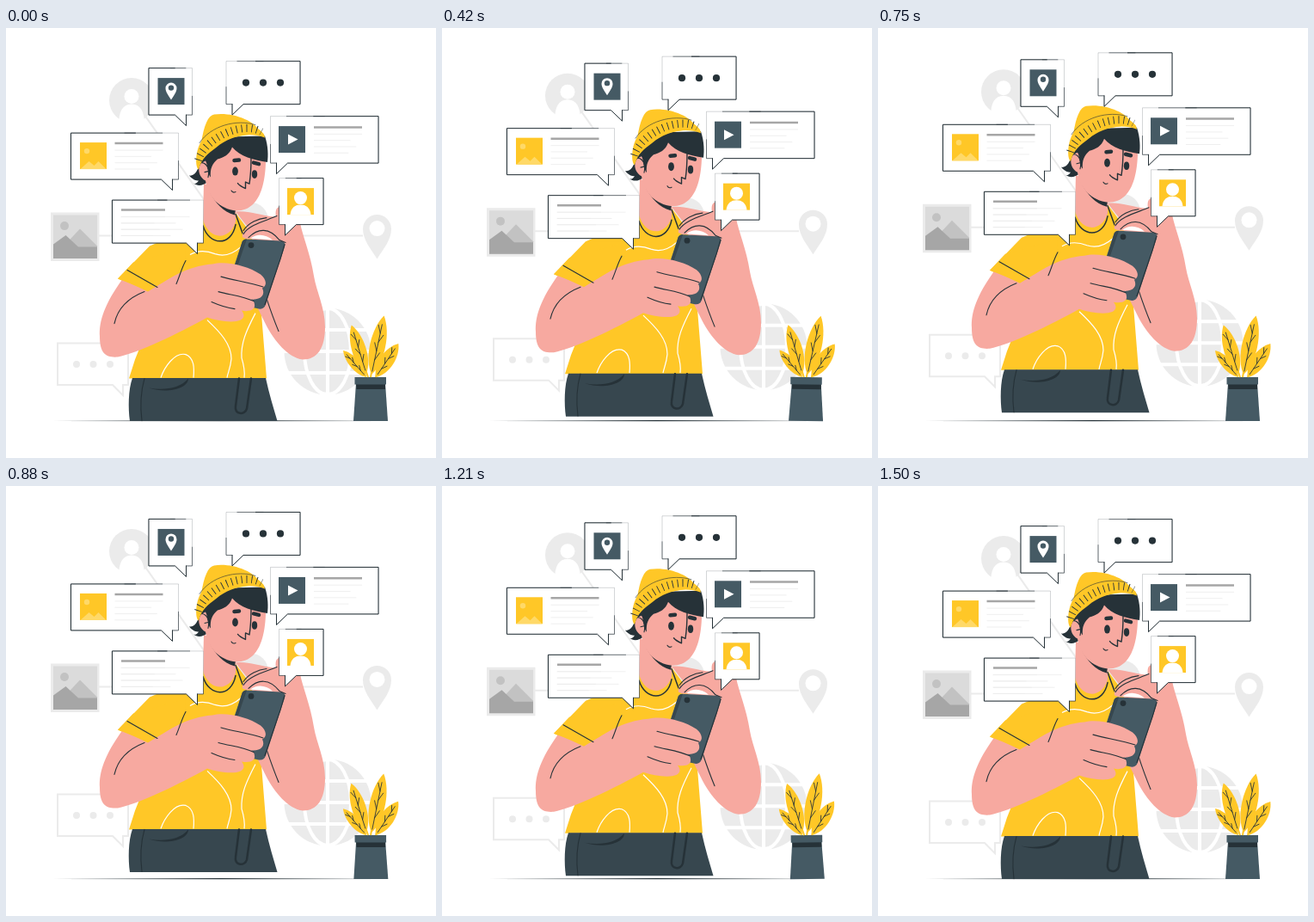
Animation, 500 px wide and 500 px high, one loop 1.54 s. Source, as an HTML page:

```html
<!DOCTYPE html>
<html lang="en">
<head>
<meta charset="utf-8">
<title>Social media</title>
<style>
  html, body { margin: 0; height: 100%; overflow: hidden; background: #fff; }
  svg { display: block; width: 100vw; height: 100vh; }
  .line { fill: none; stroke: #263238; stroke-width: 1.1; stroke-linecap: round; stroke-linejoin: round; }
  .dark { fill: #263238; }
  .slate { fill: #455a64; }
  .yellow { fill: #ffc727; }
  .skin { fill: #f7a9a0; }
  .pale { fill: #ebebeb; }
  .paleLine { fill: none; stroke: #ebebeb; stroke-width: 2; }
  .white { fill: #fff; }
  .whiteLine { fill: none; stroke: #fff; stroke-width: 1.2; }
</style>
</head>
<body>
<svg viewBox="0 0 500 500">
  <path class="dark" d="M55 456.900L250 456.100 445 456.900 250 457.300Z"/>

  <g id="floating">
    <g id="background">
      <path class="paleLine" d="M160 99L238 210M108 241H415"/>
      <circle class="pale" cx="284" cy="223" r="21"/>
      <circle class="pale" cx="146" cy="83.500" r="26"/>
      <circle class="white" cx="146" cy="79" r="8.500"/>
      <path class="white" d="M131 112C131 96 136 88 146 88S161 96 161 112Z"/>

      <path class="pale" d="M52 214H108.500V270.500H52Z"/>
      <path fill="#dbdbdb" d="M55 217H106V267.500H55Z"/>
      <circle cx="68" cy="229.500" r="5" fill="#c2c2c2"/>
      <path fill="#c2c2c2" d="M70 250L86 233 106 253V256H70Z"/>
      <path fill="#a6a6a6" d="M55 251L69.500 240.500 84 254H106V267.500H55Z"/>

      <path class="pale" d="M431.500 268C424 256 415 246 415 233A16.500 16.500 0 0 1 448 233C448 246 439 256 431.500 268Z"/>
      <circle class="white" cx="431.500" cy="232.500" r="9"/>

      <circle class="pale" cx="374" cy="375.500" r="50.500"/>
      <g class="whiteLine" style="stroke-width:4">
        <path d="M374 324V428M322 375.500H426M326 350.500H422M326 400.500H422"/>
        <ellipse cx="374" cy="375.500" rx="27" ry="50"/>
      </g>

      <path class="paleLine" d="M60 366H142V414.500H136V426.500L124 414.500H60Z"/>
      <g class="pale">
        <circle cx="82" cy="390.500" r="4"/><circle cx="101.500" cy="390.500" r="4"/><circle cx="121" cy="390.500" r="4"/>
      </g>
    </g>

    <g id="body">
      <path class="yellow" d="M230 221C220 230 196 241 167 253L130 291 166 308 160 360 150 385 143 407H303L297 332 290 300 286 240 266 213Z"/>
      <path class="whiteLine" d="M180 406C184 394 196 376 209 379 219 383 219 395 218 406M234 339C249 353 262 367 262 384 261 395 258 400 257 406M290 331C279 352 273 366 274 383 277 393 278 399 277 406M214 263C224 257 233 258 243 262 255 266 264 262 273 254"/>
      <path fill="#37474f" d="M147 406.500C142 420 142 442 144 456.500H315.500C311 441 306 425 302 406.500Z"/>
      <path class="line" d="M161 407C157 421 156 440 158 456"/>
      <path class="dark" d="M166 418C183 421 202 419 212 407 212 419 187 425 166 418Z"/>
      <path class="line" style="stroke-width:2.500" d="M271 407L267 439C265 449 278 450 280 442L285 407"/>

      <path class="skin" d="M230 180L229 222C236 247 260 247 267 225L268 200Z"/>
      <path class="line" style="stroke-width:1.500" d="M229 229C236 253 262 254 267 228M267 216L275 238"/>
      <path class="dark" d="M237 191C246 201 255 207 267 210L266 217C252 213 244 203 237 191Z"/>
    </g>

    <g id="far-arm">
      <path class="skin" d="M267 213C280 211 293 217 314 219 312 207 318 204 325 212L342 226C345 242 354 262 358 288 361 306 371 325 371 347 371 372 362 385 345 385 328 383 312 363 303 346L292 324 300 310 315 250 275 243C274 238 278 234 281 231Z"/>
      <path class="line" d="M303 314C307 326 312 340 317 352"/>
    </g>

    <g id="head">
      <path class="dark" d="M226 155C223 166 219 172 213 171 217 176 221 177 224 177 222 180 220 181 218 180 223 184 229 183 235 178L238 158Z"/>
      <path class="skin" d="M234 148L246 128 302 140C303 166 301 212 268 212 248 210 235 196 232 177 222 172 221 155 234 154Z"/>
      <path class="line" d="M228 156C234 157 237 164 235 173M231 167L235 166"/>
      <path class="dark" d="M226 157C230 143 242 130 258 126L301 125C305 137 305 148 304 155.500 288 153 272 149 263 138 260 147 253 150 246 152 240 157 237 163 238 173 234 169 235 159 232 154Z"/>
      <path class="yellow" d="M227 133C230 113 235 101 242 100 262 97 289 106 296 121Z"/>
      <path class="yellow" d="M224 164C220 162 220 144 226 133 240 111 283 101 300 123L301 127C280 119 258 127 245 138 234 146 227 152 224 164Z"/>
      <path class="line" style="stroke-width:.6" d="M225 133C238 113 268 105 290 112"/>
      <path class="line" style="stroke-width:9;stroke-linecap:butt;stroke-dasharray:.9 5" d="M223.500 153C228 139 241 128 257 121 272 115 286 114 297 120"/>
      <ellipse class="dark" cx="266.500" cy="166" rx="3.400" ry="5"/>
      <ellipse class="dark" cx="289" cy="169.500" rx="3.200" ry="4.800"/>
      <path class="line" style="stroke-width:4.500" d="M265.500 153.500L271 153M288 156L294 157.500"/>
      <path class="line" style="stroke-width:1.400" d="M285 151C285 164 284 174 283 180.500L278.500 178.500V186C274 184 271 182 269.500 180"/>
      <path class="line" d="M262 188.500C263 190.500 265 191 267 190"/>
    </g>

    <g id="hands">
      <path class="slate" d="M274 250Q275 245 280 245L319 247Q326 248 324 254L302 321Q300 327 294 326L266 320 264 280Z"/>
      <path fill="#37474f" d="M274 250Q275 245 280 245L269 277 264 283Z"/>
      <circle class="dark" cx="285" cy="252" r="3.400"/>
      <path class="line" d="M324 251L319 268 301 321"/>
      <path class="skin" d="M276 241C284 228 302 219 317 220L328 235 322 247C310 244 302 236 290 243 283 246 275 245 276 241Z"/>
      <path class="white" d="M284 244C292 238 302 239 310 246Z"/>
      <path class="line" d="M276 239C283 228 301 224 315 218M282 243C293 232 306 231 318 246L325 249M276 235C282 226 293 221 303 220"/>

      <path class="skin" d="M135 292C115 320 108 340 109 358 109 378 116 383 130 382 152 378 202 354 234 336 246 340 264 343 273 339 278 336 277 332 274 328 285 330 290 326 289 321 289 318 287 316 285 315 296 316 302 310 298 302 304 299 303 292 296 286 281 276 256 270 240 274 210 276 188 292 165 306Z"/>
      <path class="yellow" d="M148 272L130 291 166 305 186 293 210 278 208 255Z"/>
      <path class="line" d="M126 343C130 325 143 313 161 306M250 288.500C266 293 283 295 299 300.500M247 306C262 310 275 311 288 317M239 318C248 322 257 325 266 326M141 281L176 301M209 270C204 279 202 288 198 297"/>
    </g>

    <g id="bubbles"></g>
  </g>

  <g id="plant">
    <path class="slate" d="M407 413H441L444 457H404Z"/>
    <path class="dark" d="M407 413H441V420H407.500Z"/>
    <path class="slate" d="M405.500 406H442V414.500H405.500Z"/>
    <path d="M421 406L417 394M424 406L426 394M430 406L432 398" stroke="#ffc727" stroke-width="2"/>
  </g>
</svg>
<script>
const byId = id => document.getElementById(id);
const add = (id, markup) => byId(id).insertAdjacentHTML('beforeend', markup);

// Speech bubble with its tail at the bottom right, or mirrored to the left.
function bubble(x, y, w, h, mirrored, content) {
  const tail = `V${h}H${w - 20}l13 12.500v-12.500`;
  const place = mirrored ? `translate(${x + w} ${y}) scale(-1 1)` : `translate(${x} ${y})`;
  add('bubbles', `<g transform="${place}">
    <path class="line" style="fill:#fff;stroke-width:.2" d="M0 0H${w}V${h}H${w - 7}v12.500l-13 -12.500H0Z"/>
    <path class="line" style="stroke-width:1" d="M${w * .6} 0H0${tail}"/>
    <path class="line" style="stroke-width:.6" d="M${w * .85} 0H${w * .5}M${w - 7} ${h}H${w}V${h * .6}"/>
  </g><g transform="translate(${x} ${y})">${content}</g>`);
}

const box = (x, y, kind) => `<path class="${kind}" d="M${x} ${y}h31v31h-31z"/>`;
const dot = (x, y, r, kind) => `<circle class="${kind}" cx="${x}" cy="${y}" r="${r}"/>`;

function textLines(x, y, w) {
  const thin = [1, .76, .88, .72]
    .map((part, i) => `M${x} ${y + 8 + i * 7.3}h${w * part}`).join('');
  return `<path d="M${x} ${y}h${w}" stroke="#a6a6a6" stroke-width="2.500"/>
    <path d="${thin}" stroke="#ebebeb" stroke-width=".8"/>`;
}

bubble(166, 46, 50.5, 54.5, false, box(10.5, 11.5, 'slate') +
  '<path class="white" d="M26 37C23 32 19.500 28 19.500 23.500A6.500 6.500 0 0 1 32.500 23.500C32.500 28 29 32 26 37Z"/>' +
  dot(26, 23, 3.2, 'slate'));
bubble(256, 38, 86, 50, true, [23, 43, 63].map(x => dot(x, 25, 4.1, 'dark')).join(''));
bubble(75.5, 121.5, 125, 54, false, box(10.5, 11, 'yellow') +
  '<g fill="#ffd968"><circle cx="18.500" cy="21" r="3.200"/>' +
  '<path d="M11 42L21 33 27 38 32 33 41 42Z"/></g>' + textLines(51, 12, 56));
bubble(307.5, 102, 125.5, 54.5, true, box(9.5, 11.5, 'slate') +
  '<path class="white" d="M20.500 21L32 27 20.500 33Z"/>' + textLines(50.5, 12.8, 56));
bubble(123.5, 199.5, 106, 50, false, textLines(10.5, 11.5, 51) +
  '<path d="M10 19.500h80M10 26.800h64M10 34.100h72M10 41.400h58" stroke="#ebebeb" stroke-width=".8"/>');
bubble(317.5, 174, 51.5, 54, true, box(9.5, 11.5, 'yellow') + dot(25, 23, 7.5, 'white') +
  '<path class="white" d="M13 42.500C14 34 19 31 25 31S36 34 37 42.500Z"/>');

function leaf(x, y, angle, length, width) {
  const veins = [.25, .4, .55, .7].map((part, i) =>
    `M0 ${-part * length}l${width * (i % 2 ? -.35 : .35)} ${-length * .13}`).join('');
  add('plant', `<g transform="translate(${x} ${y}) rotate(${angle})">
    <path class="yellow" d="M0 0C${-width * 1.1} ${-length * .25} ${-width} ${-length * .75} 0 ${-length}
      C${width} ${-length * .75} ${width * 1.1} ${-length * .25} 0 0Z"/>
    <path class="line" style="stroke-width:.8" d="M0 -4V${-length * .85}${veins}"/></g>`);
}
leaf(425, 403, 12, 70, 11.5);
leaf(419, 402, -17, 59, 10.5);
leaf(419, 406, -41, 41, 7.5);
leaf(430, 406, 34, 47, 10.5);

const LOOP = 1540, CYCLE = 36, LIFT = 9.8, BASE = .6;

function draw(now) {
  const step = Math.floor((now % LOOP) * .024 + .1);
  const phase = (step % CYCLE) / CYCLE;
  const rise = LIFT * (1 - Math.abs(1 - 2 * phase));
  const angle = phase < .25 ? phase * 4 : phase < .75 ? 2 - phase * 4 : phase * 4 - 4;
  byId('floating').setAttribute('transform', `translate(0 ${BASE - rise})`);
  byId('plant').setAttribute('transform', `rotate(${angle} 424.5 395.5)`);
}

const start = performance.now();
function tick() {
  draw(performance.now() - start);
  requestAnimationFrame(tick);
}
tick();
</script>
</body>
</html>
```
